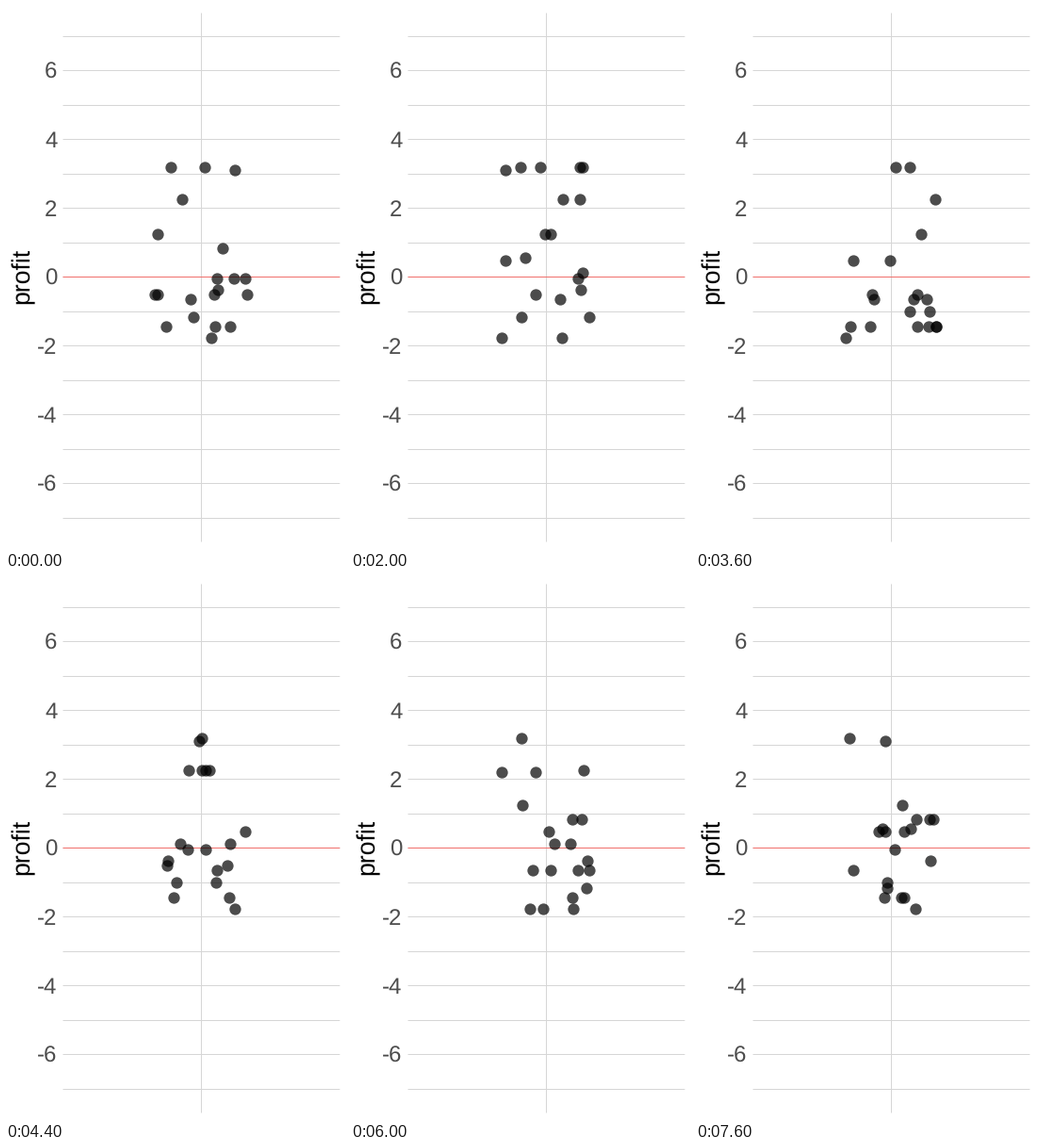
Write a matplotlib script that moves like this. It is 360x576 px and loops after 8 s.

```python
import numpy as np
import matplotlib.pyplot as plt
from matplotlib.animation import FuncAnimation

W, H = 360, 576
FRAMES, INTERVAL = 20, 400
LEFT, RIGHT, TOP, BOTTOM = 60, 354, 7, 568
MID, ZERO, UNIT = 207, 286.9, 36.5
JITTER = 49
RADIUS = 6.15

PROFITS = [3.18, 3.08, 2.25, 2.25, 2.2, 1.22, 0.82, 0.55, 0.46, 0.11,
           -0.07, -0.39, -0.51, -0.66, -0.66, -1.02, -1.18, -1.45, -1.45,
           -1.79]


def height(value):
    return ZERO - UNIT * value


def resample(step):
    """Draw the profits with replacement and jitter them sideways."""
    rng = np.random.default_rng(step)
    values = rng.choice(PROFITS, len(PROFITS))
    xs = MID + rng.uniform(-JITTER, JITTER, len(PROFITS))
    return np.column_stack([xs, height(values)])


plt.rcParams["font.family"] = "Liberation Sans"
plt.rcParams["axes.unicode_minus"] = False
plt.rcParams["text.hinting"] = "none"

# At 72 dpi one point equals one pixel
fig = plt.figure(figsize=(W / 72, H / 72), dpi=72, facecolor="white")
ax = fig.add_axes([0, 0, 1, 1])
ax.set_xlim(0, W)
ax.set_ylim(H, 0)
ax.axis("off")


def line(xs, ys, color="#d6d6d6"):
    ax.plot(xs, ys, color=color, lw=1, solid_capstyle="butt", snap=True)


def across(value, **style):
    y = int(height(value)) + 0.5
    line([LEFT, RIGHT], [y, y], **style)


for v in range(-7, 8):
    across(v)
    if v % 2 == 0:
        ax.text(54.5, height(v) + 9, str(v), size=24, color="#4d4d4d",
                ha="right", va="baseline")
line([MID - 0.5, MID - 0.5], [TOP, BOTTOM])
across(0, color="#f0706c")
ax.text(24.6, ZERO - 1, "profit", size=26.67, color="black", rotation=90,
        rotation_mode="anchor", ha="center", va="baseline")

dots = ax.scatter([], [], s=(2 * RADIUS) ** 2, color="black", alpha=0.7,
                  linewidths=0, zorder=3)


def draw(step):
    dots.set_offsets(resample(step))
    return dots,


anim = FuncAnimation(fig, draw, frames=FRAMES, interval=INTERVAL,
                     repeat=True, repeat_delay=0, blit=False)
plt.show()
```
